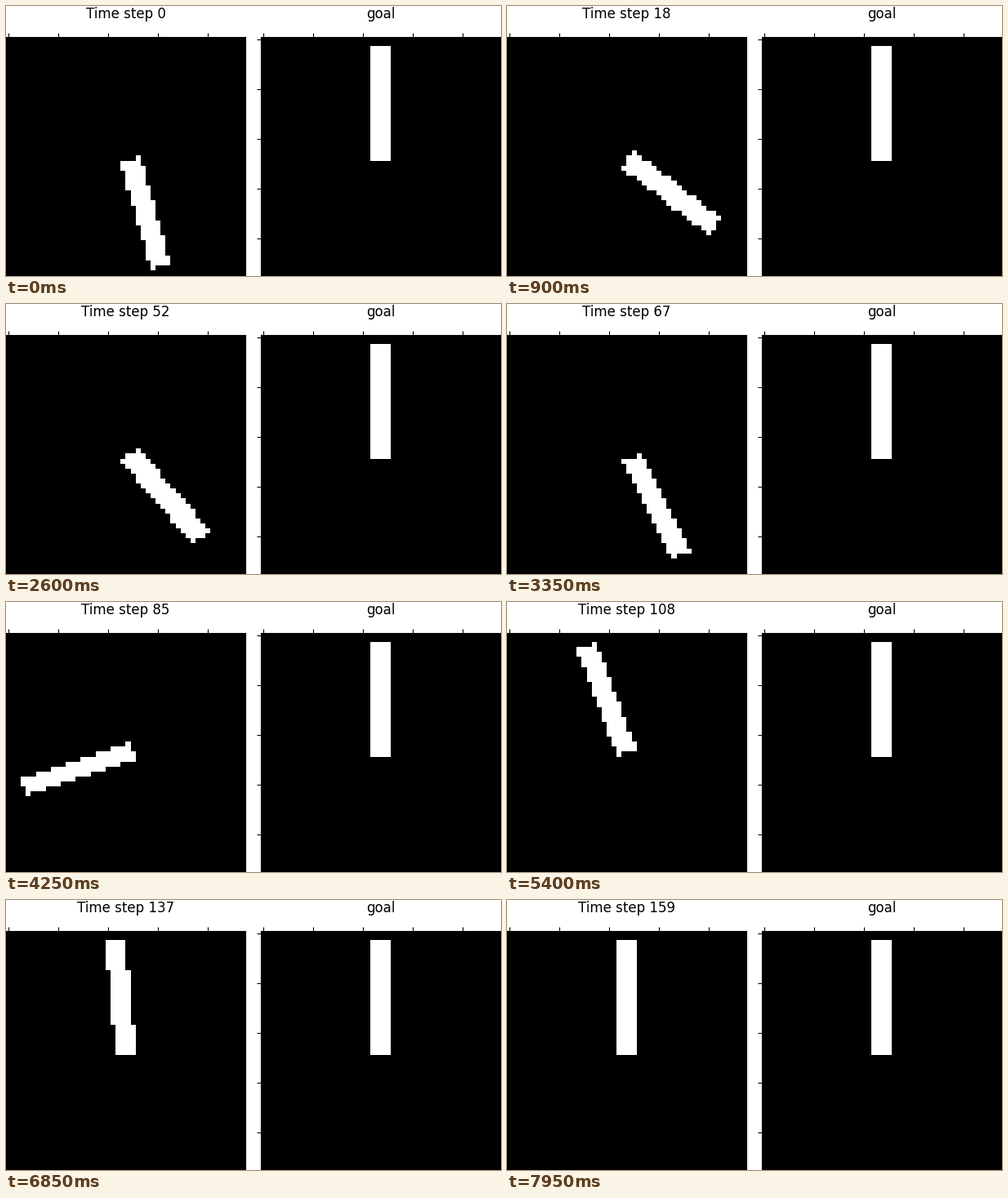
Write a matplotlib script that moves like this. It is 606 px wide and 331 px high and loops after 8000 ms.

```python
import math

import matplotlib.pyplot as plt
import numpy as np
from matplotlib.animation import FuncAnimation

W, H, DPI = 606, 331, 100
FRAMES, INTERVAL = 160, 50
GRID, CELL = 48, 6.107
PIVOT, LENGTH = 24, 22
LEFTS = (-0.12, 311.85)      # left edge of each panel, in pixels
AXES_TOP, CELLS_TOP = 37.8, 36.9

# Pole angle in degrees from hanging down, positive to the right.
KEYS = np.array([
    (0, 16.5), (8, -14), (17.5, 52.5), (26, -9), (38.5, 48.5), (46.3, -1.5),
    (53.5, 48.5), (61, -20), (69.9, 44.5), (85, -70), (88, -105),
    (98.5, -211.5), (102, -205.5), (108, -160), (112.5, -142), (125, -202.7),
    (137, -176.1), (155, -196.3), (159, -181.2), (164, -165),
])


def key_slopes(t, v):
    """Slopes of a monotone cubic: flat at turning points."""
    h = np.diff(t)
    s = np.diff(v) / h
    m = np.zeros(len(t))
    for i in range(1, len(t) - 1):
        if s[i - 1] * s[i] > 0:
            a, b = 2 * h[i] + h[i - 1], h[i] + 2 * h[i - 1]
            m[i] = (a + b) / (a / s[i - 1] + b / s[i])
    return m


TIMES, ANGLES = KEYS.T
SLOPES = key_slopes(TIMES, ANGLES)


def angle(frame):
    i = min(np.searchsorted(TIMES, frame, side="right") - 1, len(TIMES) - 2)
    h = TIMES[i + 1] - TIMES[i]
    u = (frame - TIMES[i]) / h
    ease = u * u * (3 - 2 * u)
    return (ANGLES[i] + (ANGLES[i + 1] - ANGLES[i]) * ease
            + h * SLOPES[i] * u * (1 - u) ** 2
            + h * SLOPES[i + 1] * u * u * (u - 1))


def half_up(v):
    return int(math.copysign(math.floor(abs(v) + 0.5), v))


def half_down(v):
    return int(math.copysign(math.ceil(abs(v) - 0.5), v))


def pole_corners(x1, y1):
    """Corners of a four-cell-wide line from the pivot, on whole cells."""
    dx, dy = x1 - PIVOT, y1 - PIVOT
    hyp = math.hypot(dx, dy)
    ax, bx = half_down(dy / hyp), half_down(2 * dy / hyp)
    ay, by = half_up(dx / hyp), half_up(2 * dx / hyp)
    return [(PIVOT - ax, PIVOT + by), (x1 - ax, y1 + by),
            (x1 + bx, y1 - ay), (PIVOT + bx, PIVOT - ay)]


def fill_convex(corners):
    cells = np.zeros((GRID, GRID), np.uint8)
    edges = list(zip(corners, corners[1:] + corners[:1]))
    ys = [y for _, y in corners]
    for y in range(min(ys), max(ys) + 1):
        xs = []
        for (xa, ya), (xb, yb) in edges:
            if ya == yb == y:
                xs += [xa, xb]
            elif ya != yb and min(ya, yb) <= y <= max(ya, yb):
                xs.append(xa + (xb - xa) * (y - ya) / (yb - ya))
        lo = math.ceil(min(xs) - 0.5)
        hi = math.floor(max(xs) + 0.5)
        cells[y, lo:hi + 1] = 255
    return cells


def pole(degrees):
    a = math.radians(degrees)
    x1 = math.floor(PIVOT + LENGTH * math.sin(a) + 1e-9)
    y1 = math.floor(PIVOT + LENGTH * math.cos(a) + 1e-9)
    return fill_convex(pole_corners(x1, y1))


def paint(canvas, left, cells):
    """Enlarge the cells onto one panel with hard edges."""
    x0, y0 = round(left), round(AXES_TOP)
    cols = np.arange(x0, x0 + 294)
    rows = np.arange(y0, H)
    cx = np.floor((cols + 0.5 - left) / CELL).astype(int).clip(0, GRID - 1)
    cy = np.floor((rows + 0.5 - CELLS_TOP) / CELL).astype(int).clip(0, GRID - 1)
    canvas[y0:, x0:x0 + 294] = cells[np.ix_(cy, cx)]


def add_panel(left, label):
    size = GRID * CELL
    ax = fig.add_axes([left / W, 1 - (AXES_TOP + size) / H, size / W, size / H])
    ax.patch.set_visible(False)
    ax.set(xlim=(-0.5, GRID - 0.5), ylim=(GRID - 0.5, -0.5),
           xticks=range(0, GRID, 10), yticks=range(0, GRID, 10))
    ax.tick_params(top=True, bottom=False, labelleft=False, labelbottom=False)
    return fig.text((left + size / 2) / W, 1 - 15 / H, label, fontsize=12,
                    ha="center", va="baseline")


fig = plt.figure(figsize=(W / DPI, H / DPI), dpi=DPI, facecolor="white")
base = np.full((H, W), 255, np.uint8)
paint(base, LEFTS[1], pole(180))
screen = fig.figimage(base, cmap="gray", vmin=0, vmax=255, origin="upper",
                      zorder=-1)
title = add_panel(LEFTS[0], "Time step 0")
add_panel(LEFTS[1], "goal")


def draw(frame):
    canvas = base.copy()
    paint(canvas, LEFTS[0], pole(angle(frame)))
    screen.set_data(canvas)
    title.set_text(f"Time step {frame}")
    return screen, title


anim = FuncAnimation(fig, draw, frames=FRAMES, interval=INTERVAL, repeat=True,
                     init_func=lambda: draw(0))
plt.show()
```
